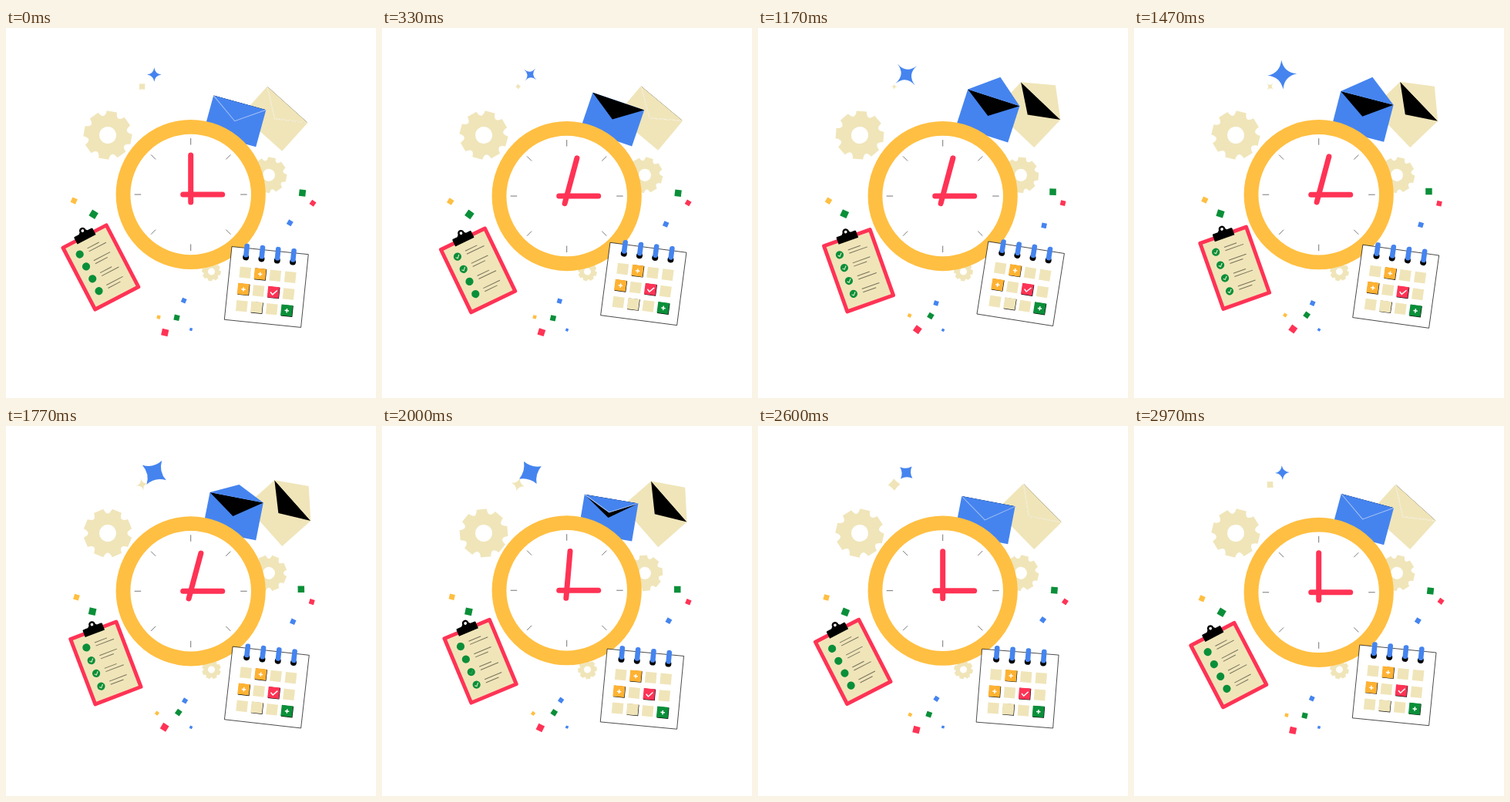
Recreate the animation shown at these times as an HTML page. Size 480 by 480 pixels, loop 3 s.

```html
<!DOCTYPE html>
<html lang="en">
<head>
<meta charset="utf-8">
<title>Time planning</title>
<style>
  html, body { margin: 0; width: 100%; height: 100%; overflow: hidden; background: #fff; }
  svg { display: block; width: 100vw; height: 100vh; }
</style>
</head>
<body>
<svg id="stage" viewBox="0 0 480 480"></svg>
<script>
const LOOP = 3000;
const BLUE = '#4584ef', CREAM = '#f0e5b9', AMBER = '#ffbf42', RED = '#ff3355', GREEN = '#0a8f39';
const stage = document.getElementById('stage');

function add(parent, tag, attrs = {}) {
  const node = document.createElementNS('http://www.w3.org/2000/svg', tag);
  set(node, attrs);
  parent.append(node);
  return node;
}
function set(node, attrs) {
  for (const key in attrs) node.setAttribute(key, attrs[key]);
}
const group = (parent = stage) => add(parent, 'g');
const rect = (parent, x, y, width, height, fill, more) =>
  add(parent, 'rect', { x, y, width, height, fill, ...more });
const disc = (parent, cx, cy, r, fill) => add(parent, 'circle', { cx, cy, r, fill });
const line = (parent, d, stroke, width, more) =>
  add(parent, 'path', { d, stroke, 'stroke-width': width, fill: 'none', ...more });
const place = (node, x, y, angle = 0) =>
  node.setAttribute('transform', `translate(${x} ${y}) rotate(${angle})`);

// One sine cycle per loop, advanced by lead ms.
const sin = (t, lead = 0) => Math.sin(2 * Math.PI * (t + lead) / LOOP);
const cos = (t, lead = 0) => Math.cos(2 * Math.PI * (t + lead) / LOOP);
function ease(t, start, length) {
  const p = Math.min(1, Math.max(0, (t - start) / length));
  return (1 - Math.cos(Math.PI * p)) / 2;
}
// Rises to 1 at one time and returns to 0 at a later one.
const pulse = (t, on, off, length) => ease(t, on, length) - ease(t, off, length);

const updates = [];

function polar(r, degrees) {
  const a = degrees * Math.PI / 180;
  return `${(r * Math.sin(a)).toFixed(2)} ${(-r * Math.cos(a)).toFixed(2)}`;
}

function gear(x, y, r, hole) {
  const g = group();
  let d = '';
  for (let a = 0; a < 360; a += 45) {
    d += `${a ? 'L' : 'M'}${polar(r, a - 12)}L${polar(r, a + 12)}` +
         `Q${polar(r * 0.62, a + 22.5)} ${polar(r, a + 33)}`;
  }
  add(g, 'path', { d: d + 'Z', fill: CREAM });
  disc(g, 0, 0, hole, '#fff');
  updates.push(t => place(g, x, y, 10 - 360 * t / LOOP));
}

function envelope(color, crease, pose, openAmount) {
  const W = 70.6, H = 49.7, DEPTH = 24.7, OPEN_DEPTH = 28;
  const g = group();
  const triangle = tip => `M${-W} ${-H}L${-W / 2} ${tip - H}L0 ${-H}`;
  rect(g, -W, -H, W, H, color);
  add(g, 'path', { d: triangle(DEPTH) });
  const flap = add(g, 'path', { fill: color, 'stroke-width': 1 });
  updates.push(t => {
    const s = 1 - 2 * openAmount(t);
    place(g, ...pose(t));
    set(flap, { d: triangle(s * (s > 0 ? DEPTH : OPEN_DEPTH)), stroke: s > 0.05 ? crease : 'none' });
  });
}

// Four tips joined by curves; pinch is the control radius relative to the tips.
function star(x, y, color, radius, pinch, turn) {
  const node = add(stage, 'path', { fill: color });
  updates.push(t => {
    const r = radius(t), waist = r * pinch(t);
    let d = `M${polar(r, 0)}`;
    for (let a = 0; a < 360; a += 90) d += `Q${polar(waist, a + 45)} ${polar(r, a + 90)}`;
    node.setAttribute('d', d + 'Z');
    place(node, x, y, turn + 360 * t / LOOP);
  });
}

function clock() {
  const g = group();
  add(g, 'circle', { r: 87.7, fill: '#fff', stroke: AMBER, 'stroke-width': 18.8 });
  for (let a = 0; a < 360; a += 45) line(g, `M${polar(64.5, a)}L${polar(73, a)}`, '#777', 1);
  const round = { 'stroke-linecap': 'round' };
  line(g, 'M-10 0H41', RED, 7, round);
  const minute = line(g, 'M0 10V-51', RED, 7, round);
  updates.push(t => {
    place(g, 239.7, 216 + 3.2 * sin(t));
    place(minute, 0, 0, 15 * pulse(t, 80, 1860, 230));
  });
}

function clipboard() {
  const g = group();
  rect(g, 1.3, -91.5, 63.4, 90.3, CREAM, { stroke: RED, 'stroke-width': 4.9, 'stroke-linejoin': 'round' });
  add(g, 'path', { d: 'M20 -87V-96Q20 -97 21.5 -97H27.5L29.5 -99H38L40 -97H45.5Q47 -97 47 -96V-87Z' });
  add(g, 'circle', { cx: 34, cy: -99.3, r: 3.1, fill: '#fff', stroke: '#000', 'stroke-width': 2.5 });
  for (let i = 0; i < 4; i++) {
    const y = -73.9 + 17.9 * i;
    disc(g, 16.7, y, 5.1, GREEN);
    line(g, `M29 ${y - 2.3}H${i % 2 ? 53 : 46}M29 ${y + 2.2}H${i % 2 ? 47 : 54}`, '#77725c', 1);
    const check = line(g, `M14.2 ${y}l2 2l3.4 -3.8`, '#d5e6bd', 1.2);
    updates.push(t => set(check, { opacity: pulse(t, 80 + 140 * i, 1650 + 140 * i, 100) }));
  }
  updates.push(t => place(g, 115, 366.2 + 6 * sin(t, 50), -23.5 - 4.2 * cos(t, 150)));
}

function calendar() {
  const g = group();
  rect(g, -99.8, -95.2, 99.8, 95.2, '#fff', { stroke: '#000', 'stroke-width': 0.9, 'stroke-opacity': 0.75 });
  const PLUS = 'M-2.7 0H2.7M0 -2.7V2.7', CHECK = 'M-4 0l3 3l5.5 -6';
  const marked = {
    1: ['#ffb232', PLUS], 4: ['#ffb232', PLUS], 6: [RED, CHECK], 9: [CREAM, ''], 11: [GREEN, PLUS]
  };
  for (let i = 0; i < 12; i++) {
    const cell = group(g);
    place(cell, -79.2 + 19.6 * (i % 4), -63.4 + 21.8 * Math.floor(i / 4));
    if (marked[i]) {
      const [color, sign] = marked[i];
      rect(cell, -7, -7, 14.8, 14.6, '#000');
      rect(cell, -7.6, -7.4, 14.8, 14.4, color);
      line(cell, sign, '#fff', 1.5);
    } else {
      rect(cell, -7.2, -7, 14.4, 14, CREAM);
    }
  }
  for (let i = 0; i < 4; i++) {
    const x = -80.3 + 20.4 * i;
    disc(g, x, -83.3, 4, '#000');
    rect(g, x - 3.3, -101, 6.6, 17.8, BLUE, { rx: 3 });
  }
  updates.push(t => place(g, 382.6, 389 - 4.6 * sin(t, 60), 6.8 + 2.4 * sin(t, -200)));
}

// color, size, then per axis: centre, cosine drift, sine drift
const confetti = [
  [AMBER, 7, 90, -1.8, 0.2, 223.5, 0.5, 1.8],
  [GREEN, 9, 112.8, 0.8, 0, 241.3, 0.5, 0.3],
  [GREEN, 8.5, 383.5, 1, -0.3, 213, 1, 0.7],
  [RED, 6.5, 397, 1, -1, 227.5, -0.2, -0.8],
  [BLUE, 6.5, 370.2, -1.9, -0.9, 254, -1.2, 2.2],
  [BLUE, 6, 231.2, -0.5, -0.8, 355.3, -1.7, 0.5],
  [AMBER, 4.5, 197, 1, 0.5, 373.8, 1.3, 0.2],
  [GREEN, 7, 222.8, -1.3, 0.2, 374, 1.8, 1.5],
  [RED, 8.6, 206.2, 0, 1, 392.8, 2.2, 0.3],
  [BLUE, 3.5, 240, 0, 0, 391.2, -0.2, 0.8]
];

function scatter() {
  confetti.forEach(([color, size, x, xc, xs, y, yc, ys], i) => {
    const bit = rect(stage, -size / 2, -size / 2, size, size, color);
    updates.push(t => place(bit,
      x + xc * cos(t) + xs * sin(t),
      y + yc * cos(t) + ys * sin(t),
      (i === 2 ? 3 : 24) + (i === 2 ? 4 : 12) * sin(t, i * 300)));
  });
}

gear(132, 139, 31.7, 11);
gear(341, 190.8, 23.5, 8);
gear(266.5, 316, 12.5, 4.5);
star(192.3, 60.5, BLUE, t => 14.2 - 4.9 * cos(t), t => 0.18 - 0.23 * sin(t, 30), 0);
star(176.6, 76, CREAM, t => 5.9 - 3.2 * sin(t, 90), t => 0.32 + 0.34 * cos(t, 80), 45);
envelope(CREAM, '#faf5e2',
  t => [358.2, 157.5 + 2.6 * cos(t, 200), 44.2 - 4.6 * sin(t, 250)],
  t => pulse(t, 520, 1980, 500));
envelope(BLUE, '#a9c6fa',
  t => [324.2, 151 + 3.2 * cos(t), 14.7 + 5.7 * sin(t, 50)],
  t => pulse(t, 80, 1625, 500));
clock();
clipboard();
calendar();
scatter();

function draw(now) {
  const t = now % LOOP;
  for (const update of updates) update(t);
}

const start = performance.now();
function tick() {
  draw(performance.now() - start);
  requestAnimationFrame(tick);
}
tick();
</script>
</body>
</html>
```
